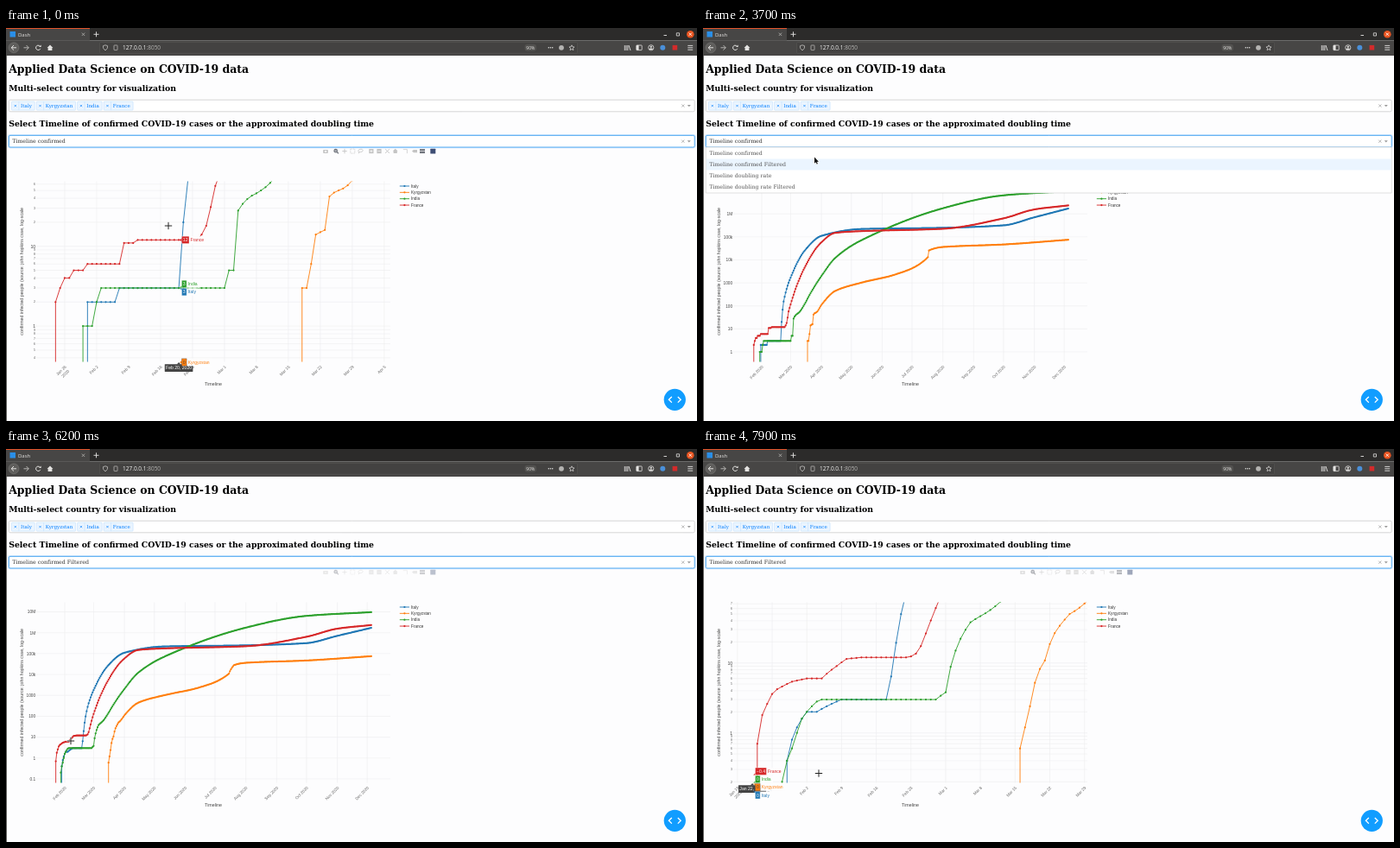
Write an HTML page with a canvas that moves like this. It is 800 px wide and 455 px high and loops after 8 s.

```html
<!DOCTYPE html>
<html lang="en">
<head>
<meta charset="utf-8">
<title>Dash</title>
<style>
html, body { margin: 0; width: 100%; height: 100%; overflow: hidden; background: #fdfdfe; }
canvas { display: block; width: 800px; height: 455px; }
</style>
</head>
<body>
<canvas id="stage"></canvas>
<script>
const LOOP = 8000, STEP = 100, DAY = 864e5;
const SANS = '"Liberation Sans", Arial, sans-serif';
const SERIF = '"DejaVu Serif", serif';
const UI = '"Open Sans", "Noto Sans", sans-serif';
const PLOT = { l: 34, t: 177.5, r: 445, b: 386.5 };

const canvas = document.getElementById('stage');
const ratio = window.devicePixelRatio || 1;
canvas.width = 800 * ratio;
canvas.height = 455 * ratio;
const c = canvas.getContext('2d');
c.scale(ratio, ratio);

const clamp = (v, a, b) => Math.min(Math.max(v, a), b);
const within = (t, [a, b]) => t >= a && t < b;

// ---------- data: day 0 is Jan 22, 2020 ----------
const DAYS = 319, BASE = Date.UTC(2020, 0, 22);
const dateOf = day => new Date(BASE + day * DAY);
const monthName = d => d.toLocaleString('en-US', { month: 'short', timeZone: 'UTC' });

// Whole case counts on a monotone cubic through [day, cases], in log space.
function growth(...keys) {
  const x = keys.map(k => k[0]), y = keys.map(k => Math.log(k[1])), last = x.length - 1;
  const rise = i => (y[i + 1] - y[i]) / (x[i + 1] - x[i]);
  const slope = i => {
    if (i === 0) return rise(0);
    if (i === last) return rise(last - 1);
    const a = rise(i - 1), b = rise(i);
    return a * b > 0 ? 2 * a * b / (a + b) : 0;
  };
  return Array.from({ length: DAYS }, (_, d) => {
    if (d < x[0]) return 0;
    let i = 0;
    while (i < last - 1 && x[i + 1] <= d) i++;
    const h = x[i + 1] - x[i], f = (d - x[i]) / h, g = 1 - f;
    const v = g * g * (1 + 2 * f) * y[i] + f * f * (3 - 2 * f) * y[i + 1]
      + h * f * g * (g * slope(i) - f * slope(i + 1));
    return Math.round(Math.exp(v));
  });
}

// Five day linear smoothing with fitted ends.
function smooth(v) {
  return v.map((_, i) => {
    const m = clamp(i, 2, v.length - 3);
    let sum = 0, slope = 0;
    for (let j = -2; j <= 2; j++) { sum += v[m + j]; slope += j * v[m + j]; }
    return sum / 5 + (i - m) * slope / 10;
  });
}

const series = [
  { name: 'Italy', color: '#1f77b4', raw: growth([9, 2], [15, 2], [16, 3], [29, 3], [30, 20], [32, 155], [39, 1694],
    [53, 24747], [70, 110574], [110, 219814], [192, 247832], [253, 317409], [284, 709335], [318, 1.71e6]) },
  { name: 'Kyrgyzstan', color: '#ff7f0e', raw: growth([56, 3], [57, 3], [59, 14], [61, 16], [62, 42], [66, 58],
    [70, 111], [84, 449], [110, 1016], [145, 2372], [177, 13100], [178, 25500], [192, 36300], [253, 46800], [318, 74900]) },
  { name: 'India', color: '#2ca02c', raw: growth([8, 1], [10, 1], [12, 3], [39, 3], [40, 5], [41, 5], [42, 28],
    [49, 62], [61, 499], [70, 1998], [84, 12322], [110, 70768], [192, 1.75e6], [253, 6.39e6], [318, 9.64e6]) },
  { name: 'France', color: '#d62728', raw: growth([2, 2], [3, 3], [7, 5], [10, 6], [16, 6], [17, 11], [24, 12], [33, 12],
    [35, 18], [37, 57], [53, 4532], [69, 52827], [84, 150000], [110, 177547], [192, 225198], [253, 640000],
    [284, 1.56e6], [318, 2.33e6]) }
];
series.forEach(s => s.flat = smooth(s.raw));

// x0: pixel of day 0, dx: pixels per day, y0: pixel of value 1, dy: pixels per decade
const VIEWS = [
  { from: 0, key: 'raw', zoom: true, x0: 46.8, dx: 5.285, y0: 345.1, dy: 92.4 },
  { from: 700, key: 'raw', x0: 56.5, dx: 1.152, y0: 375, dy: 26.63 },
  { from: 4400, key: 'flat', x0: 56.5, dx: 1.152, y0: 357.8, dy: 24.18 },
  { from: 7700, key: 'flat', zoom: true, x0: 57.1, dx: 5.74, y0: 328.7, dy: 81 }
];

// ---------- timing ----------
const MOUSE = [[-100, 200, 236], [0, 188, 229], [700, 188, 229], [800, 183.4, 222], [900, 161, 193],
  [2000, 128, 215], [2500, 129, 132], [3200, 129, 132], [3900, 129, 161], [4700, 129, 161],
  [6100, 24, 345], [6200, 75, 338], [6500, 52, 312], [6800, 126, 372], [7000, 134, 375.5]];
const OVER = [[-500, 500], [800, 2300], [4400, 5900], [6130, 6500], [7800, 8000]];
const DRAG = [6600, 7700], MENU = [3100, 4300], FADE = 200;

function mouse(t) {
  const i = MOUSE.findIndex(k => k[0] > t);
  if (i < 0) return MOUSE[MOUSE.length - 1].slice(1);
  const b = MOUSE[i], a = MOUSE[i - 1] || b, f = (t - a[0]) / (b[0] - a[0] || 1);
  return [a[1] + (b[1] - a[1]) * f, a[2] + (b[2] - a[2]) * f];
}
const barAlpha = t => Math.max(...OVER.map(([a, b]) =>
  clamp((t - a) / FADE, 0, 1) * clamp((b + FADE - t) / FADE, 0, 1)));

// ---------- drawing helpers ----------
function text(s, x, y, size, color, font = SANS, align = 'left', weight = '') {
  c.font = `${weight} ${size}px ${font}`;
  c.fillStyle = color;
  c.textAlign = align;
  c.fillText(s, x, y);
}
function widthOf(s, size, font = SANS) {
  c.font = `${size}px ${font}`;
  return c.measureText(s).width;
}
function paint(fill, stroke, lw) {
  if (fill) { c.fillStyle = fill; c.fill(); }
  if (stroke) { c.strokeStyle = stroke; c.lineWidth = lw; c.stroke(); }
}
function box(x, y, w, h, fill, stroke, r = 0, lw = .6) {
  c.beginPath();
  c.roundRect(x, y, w, h, r);
  paint(fill, stroke, lw);
}
function disc(x, y, r, fill, stroke, lw = .8) {
  c.beginPath();
  c.arc(x, y, r, 0, 7);
  paint(fill, stroke, lw);
}
function path(p) {
  c.beginPath();
  for (let i = 0; i < p.length; i += 2) c.lineTo(p[i], p[i + 1]);
}
function line(color, lw, ...p) { path(p); paint(null, color, lw); }
function poly(fill, ...p) { path(p); paint(fill); }
function cross(x, y, r, color, lw) {
  line(color, lw, x - r, y - r, x + r, y + r);
  line(color, lw, x - r, y + r, x + r, y - r);
}
function plus(x, y, r, color, lw) {
  line(color, lw, x - r, y, x + r, y);
  line(color, lw, x, y - r, x, y + r);
}
function chevron(x, y, w, h, color, lw) { line(color, lw, x, y - h, x + w, y, x, y + h); }

// ---------- browser frame ----------
function browser() {
  const fg = '#e4e3e1', dim = '#b5b4b2', bar = '#474645', y = 22.8;
  box(0, 0, 800, 14.5, '#2c2b2a');
  box(0, 0, 97, 14.5, bar);
  box(0, 0, 97, 1, '#e0522a');
  box(0, 14.5, 800, 17.5, bar);
  box(0, 32, .9, 423, '#4a4948');
  box(4.5, 4, 6.5, 6.5, '#2a8fe8');
  text('Dash', 14, 9.6, 6, fg, UI);
  cross(89.5, 7.3, 1.7, dim, .8);
  plus(104.5, 7.3, 3, fg, .9);
  line(fg, .9, 761.5, 8.5, 765, 8.5);
  box(776.3, 5.8, 3.2, 3.2, null, fg, 0, .8);
  disc(792.3, 7.2, 4.3, '#e95420');
  cross(792.3, 7.2, 1.6, '#fff', .9);

  disc(9, y, 6, '#5f5e5c', '#7b7a78', .5);
  chevron(6.2, y, 0, 0, fg, 1);
  line(fg, 1, 9, 20, 6.2, y, 9, 25.6);
  line(fg, 1, 6.2, y, 12, y);
  chevron(23.5, y, 2.8, 2.8, dim, 1);
  line(dim, 1, 20.5, y, 26.3, y);
  c.beginPath();
  c.arc(37.3, y, 2.7, .4, 5.6);
  paint(null, fg, 1);
  poly(fg, 38, 22, 40.6, 22, 40.6, 19.4);
  poly(fg, 47.5, 23, 51, 19.5, 54.5, 23, 53.4, 23, 53.4, 26, 48.6, 26, 48.6, 23);

  box(108.5, 16.5, 553, 12.8, '#434241', '#5a5957', 1, .5);
  line(dim, .9, 115, 19.8, 117.6, 20.7, 117.3, 23.5, 115, 26, 112.7, 23.5, 112.4, 20.7, 115, 19.8);
  box(125, 20, 4, 5.6, null, dim, .5, .8);
  text('127.0.0.1', 135, 25.2, 6.5, '#f4f4f3', UI);
  text(':8050', 135 + widthOf('127.0.0.1', 6.5, UI), 25.2, 6.5, dim, UI);
  box(600.5, 18.8, 13.5, 8, '#52514f', null, 3);
  text('90%', 607.2, 25, 5, fg, UI, 'center');
  for (let i = 0; i < 3; i++) {
    disc(628.3 + i * 2.2, y, .75, fg);
    line(fg, .9, 716.3 + i * 1.8, 20, 716.3 + i * 1.8, 26);
    line(fg, .9, 789.3, 20.4 + i * 2.4, 795.2, 20.4 + i * 2.4);
  }
  disc(643, y, 2.9, dim);
  c.beginPath();
  for (let i = 0; i <= 10; i++) {
    const a = -Math.PI / 2 + i * Math.PI / 5, r = i % 2 ? 1.5 : 3.2;
    c.lineTo(655 + r * Math.cos(a), 23 + r * Math.sin(a));
  }
  paint(null, fg, .7);
  line(fg, .9, 721, 20, 723, 26);
  box(729.8, 20, 6.4, 5.6, null, fg, .6, .8);
  box(730, 20, 2.6, 5.6, fg);
  disc(746.8, y, 3.1, null, fg);
  disc(746.8, 21.8, 1.1, fg);
  box(744.9, 23.6, 3.8, 1.5, fg, null, .7);
  disc(760.3, y, 3, '#4a90d9');
  box(771.6, 19.9, 5.6, 5.6, '#d22b2b');
}

// ---------- page ----------
function select(y, focus) {
  if (focus) box(2.8, y - .5, 795, 14.6, null, 'rgba(0,126,255,.18)', 2, 1.6);
  box(3.4, y, 793.8, 13.6, '#fff', focus ? '#2f98ee' : '#ccc', 1.5, .8);
  cross(783.8, y + 6.8, 1.6, '#999', .7);
  poly('#999', 788.8, y + 5.8, 792.8, y + 5.8, 790.8, y + 8);
}
function page(t) {
  const head = (s, y, size) => text(s, 3.2, y, size, '#000', SERIF, 'left', 'bold');
  head('Applied Data Science on COVID-19 data', 52, 12.42);
  head('Multi-select country for visualization', 72.7, 9.3);
  head('Select Timeline of confirmed COVID-19 cases or the approximated doubling time', 114.2, 9.3);
  select(83.2, false);
  let x = 6.5;
  for (const s of series) {
    const w = widthOf(s.name, 5.6, SERIF) + 14;
    box(x, 85.1, w, 10, '#ebf5ff', '#c2e0ff', .8);
    line('#c2e0ff', .6, x + 8.4, 85.1, x + 8.4, 95.1);
    cross(x + 4.3, 90.1, 1.2, '#007eff', .6);
    text(s.name, x + 10.6, 92.2, 5.6, '#007eff', SERIF);
    x += w + 2;
  }
  select(124.4, true);
  text(t < MENU[1] ? OPTIONS[0] : OPTIONS[1], 7.2, 133.2, 6.25, '#333', SERIF);
  disc(774.3, 430.3, 12.6, '#119dff');
  chevron(770.8, 430.3, -3.4, 3.3, '#fff', 0);
  line('#fff', 1.3, 770.8, 427, 767.4, 430.3, 770.8, 433.6);
  chevron(777.8, 430.3, 3.4, 3.3, '#fff', 1.3);
}
const OPTIONS = ['Timeline confirmed', 'Timeline confirmed Filtered', 'Timeline doubling rate', 'Timeline doubling rate Filtered'];
function menu(my) {
  box(3.4, 138, 793.8, 53, '#fff', '#ccc');
  OPTIONS.forEach((s, i) => {
    const y = 138.3 + i * 13.1;
    if (i === (my > 151 ? 1 : 0)) box(3.8, y, 793, 13.1, '#ebf5ff');
    text(s, 7.2, y + 8.8, 6.25, '#555', SERIF);
  });
}

function modebar(alpha) {
  c.save();
  c.globalAlpha = alpha;
  const y = 142.6, g = '#c4c4c4', d = '#72767e';
  box(367.2, y - 1.7, 5.6, 4, g, null, .6);
  disc(370, y + .3, 1.2, '#fff');
  disc(381.7, y - .4, 1.8, '#a9acb2', d, 1.1);
  line(d, 1.3, 383, y + .9, 385, y + 2.7);
  plus(392, y, 2.7, g, .9);
  c.setLineDash([1, .6]);
  box(398.8, y - 2.5, 5, 5, null, g, 0, .7);
  c.setLineDash([]);
  c.beginPath();
  c.ellipse(410.5, y - .6, 2.7, 1.7, -.2, 0, 7);
  paint(null, g, .8);
  line(g, .8, 408.7, y + .6, 408.4, y + 2.7);
  box(420.3, y - 2.6, 5.2, 5.2, g);
  plus(422.9, y, 1.5, '#fff', .7);
  box(429.4, y - 2.6, 5.2, 5.2, g);
  line('#fff', .7, 430.5, y, 433.5, y);
  cross(441.5, y, 2.4, g, .9);
  poly(g, 447.8, y, 450.7, y - 2.8, 453.6, y, 452.8, y, 452.8, y + 2.4, 448.6, y + 2.4, 448.6, y);
  line(g, .7, 459.8, y - 2, 464.4, y - 2, 464.4, y + 2.6);
  poly(g, 470, y, 471.8, y - 1.7, 476, y - 1.7, 476, y + 1.7, 471.8, y + 1.7);
  box(479, y - 2.5, 6, 2.2, d);
  box(479, y + .3, 6, 2.2, d);
  box(491.3, y - 2.8, 6, 5.6, '#3f4f75', null, .5);
  c.restore();
}

// ---------- chart ----------
const px = (v, d) => v.x0 + v.dx * d;
const py = (v, val) => val > 0 ? v.y0 - v.dy * Math.log10(val) : PLOT.b + 60;
const valueLabel = e => e >= 6 ? 10 ** (e - 6) + 'M' : e >= 4 ? 10 ** (e - 3) + 'k' : String(10 ** e);

function slanted(rows, x) {
  c.save();
  c.translate(x + 1, 391.5);
  c.rotate(-Math.PI / 4);
  rows.forEach((s, i) => text(s, -i, 1.6 + i * 6, 4.7, '#666', SANS, 'right'));
  c.restore();
}
function axes(v) {
  const grid = '#ececee', ticks = [];
  if (v.zoom) for (let d = -3; d < 80; d += 7) ticks.push(d);
  else for (let m = 1; m < 12; m++) ticks.push((Date.UTC(2020, m, 1) - BASE) / DAY);
  ticks.filter(d => within(px(v, d), [PLOT.l, PLOT.r])).forEach((d, i) => {
    const x = px(v, d), date = dateOf(d);
    line(grid, .6, x, PLOT.t, x, PLOT.b);
    const rows = [monthName(date) + ' ' + (v.zoom ? date.getUTCDate() : 2020)];
    if (v.zoom && i === 0) rows.push('2020');
    slanted(rows, x);
  });
  for (let e = -1; e < 8; e++) for (let n = 1; n < (v.zoom ? 10 : 2); n++) {
    const y = py(v, n * 10 ** e);
    if (!within(y, [PLOT.t, PLOT.b])) continue;
    line(grid, .6, PLOT.l, y, PLOT.r, y);
    if (n > 1) text(n, 34, y + 1.2, 3.5, '#555', SANS, 'right');
    else text(valueLabel(e), 34.2, y + 1.8, v.zoom ? 5.2 : 4.8, '#444', SANS, 'right');
  }
  text('Timeline', 240, 413.6, 5.3, '#444', SANS, 'center');
  c.save();
  c.translate(20.2, 281.8);
  c.rotate(-Math.PI / 2);
  text('confirmed infected people (source: john hopkins csse, log-scale', 0, 0, 5.25, '#444', SANS, 'center');
  c.restore();
}
function curves(v) {
  c.save();
  c.beginPath();
  c.rect(PLOT.l, PLOT.t, PLOT.r - PLOT.l, PLOT.b - PLOT.t);
  c.clip();
  c.lineJoin = 'round';
  for (const s of series) {
    const pts = s[v.key].map((val, d) => [px(v, d), py(v, val), val]).filter(p => p[2] > 0);
    path([pts[0][0], PLOT.b + 60, ...pts.flatMap(p => [p[0], p[1]])]);
    paint(null, s.color, .9);
    pts.forEach(p => disc(p[0], p[1], 1.12, s.color));
  }
  c.restore();
}
function legend() {
  series.forEach((s, i) => {
    const y = 183 + i * 7.35;
    line(s.color, .9, 455.8, y, 467, y);
    disc(461.4, y, 1.12, s.color);
    text(s.name, 469, y + 1.7, 4.65, '#333');
  });
}

function format(v) {
  const a = Math.abs(v), cut = (n, p) => String(+n.toFixed(p));
  return (v < 0 ? '\u2212' : '') + (a >= 1e6 ? cut(a / 1e6, 4) + 'M' : a >= 1e4 ? cut(a / 1e3, 3) + 'k' : cut(a, 1));
}

// Overlapping labels are pooled and spread around their mean.
function spread(items, gap) {
  const groups = [], mid = g => g.reduce((n, o) => n + o.y, 0) / g.length;
  for (const o of items) {
    let g = [o];
    while (groups.length) {
      const last = groups[groups.length - 1];
      if (mid(g) - mid(last) >= gap * (g.length + last.length) / 2) break;
      g = groups.pop().concat(g);
    }
    groups.push(g);
  }
  return groups.flatMap(g => g.map((o, k) => ({ ...o, at: mid(g) + (k - (g.length - 1) / 2) * gap })));
}
function hover(v, day) {
  const x = px(v, day), date = dateOf(day), half = 4.2;
  const label = `${monthName(date)} ${date.getUTCDate()}, 2020`;
  const lw = widthOf(label, 5.1) + 2.6;
  box(x - lw / 2, 389.3, lw, 8.6, '#444', null, .3);
  poly('#444', x - 2.3, 389.5, x, PLOT.b + .4, x + 2.3, 389.5);
  text(label, x, 395.4, 5.1, '#fff', SANS, 'center');

  const items = series
    .map((s, i) => ({ s, i, val: s[v.key][day], y: Math.min(py(v, s[v.key][day]), PLOT.b + .5) }))
    .filter(o => o.y >= PLOT.t)
    .sort((a, b) => a.y - b.y || b.i - a.i);
  for (const { s, val, y, at } of spread(items, 9.2)) {
    const left = x + 3.4, top = at - half, ink = s.name === 'Kyrgyzstan' ? '#444' : '#fff';
    const w = widthOf(format(val), 5.15) + 2.8;
    const tip = clamp(y, top, at + half);
    box(left + w, top, widthOf(s.name, 5) + 4, half * 2, '#fdfdfe');
    poly(s.color, x + 1.1, tip, left + .3, Math.max(top, tip - 2.3), left + .3, Math.min(at + half, tip + 2.3));
    box(left, top, w, half * 2, s.color, ink, 0, .35);
    text(format(val), left + 1.4, at + 1.8, 5.15, ink);
    text(s.name, left + w + 1.6, at + 1.8, 5, s.color);
  }
}

function zoomBox(x2, y2) {
  const x1 = 52, y1 = 312;
  c.beginPath();
  c.rect(PLOT.l, PLOT.t, PLOT.r - PLOT.l, PLOT.b - PLOT.t);
  c.rect(x1, y1, x2 - x1, y2 - y1);
  c.fillStyle = 'rgba(0,0,0,.4)';
  c.fill('evenodd');
  const arm = Math.min(5, (x2 - x1) / 3, (y2 - y1) / 3);
  for (const [x, sx] of [[x1, 1], [x2, -1]]) for (const [y, sy] of [[y1, 1], [y2, -1]]) {
    const p = [x + sx * arm, y - sy * .5, x - sx * .5, y - sy * .5, x - sx * .5, y + sy * arm];
    line('#555', 1.6, ...p);
    line('#fff', 1, ...p);
  }
}

const inPlot = (x, y) => x > PLOT.l && y > PLOT.t;
function pointer(x, y, menuOpen) {
  if (inPlot(x, y)) {
    plus(x, y, 4.6, 'rgba(255,255,255,.85)', 2.2);
    plus(x, y, 4.2, '#222', 1);
  } else if (y > 124 && y < 138 && !menuOpen) {
    line('#222', .9, x, y - 3, x, y + 3);
    for (const e of [-3.4, 3.4]) line('#222', .8, x - 1.5, y + e, x + 1.5, y + e);
  } else {
    const p = [0, -3.2, 0, 4, 1.7, 2.6, 2.8, 5, 3.9, 4.4, 2.8, 2.2, 4.9, 2].map((n, i) => n + (i % 2 ? y : x));
    line('#fff', 1.2, ...p, p[0], p[1]);
    poly('#111', ...p);
  }
}

function draw(t) {
  const v = VIEWS.filter(q => q.from <= t).pop();
  const [mx, my] = mouse(t), [lx, ly] = mouse(t - STEP);
  box(0, 0, 800, 455, '#fdfdfe');
  browser();
  page(t);
  axes(v);
  curves(v);
  legend();
  modebar(barAlpha(t));
  if (within(t, DRAG)) zoomBox(lx, ly);
  if (inPlot(lx, ly) && OVER.some(o => within(t, o))) {
    const day = clamp(Math.round((lx - v.x0) / v.dx), 0, DAYS - 1);
    hover(v, t < DRAG[1] ? day : 0);
  }
  const open = within(t, MENU);
  if (open) menu(my);
  pointer(mx, my, open);
}

const start = performance.now();
let shown = -1;
function tick() {
  const t = Math.floor((performance.now() - start) % LOOP / STEP) * STEP;
  if (t !== shown) draw(shown = t);
  requestAnimationFrame(tick);
}
tick();
</script>
</body>
</html>
```
